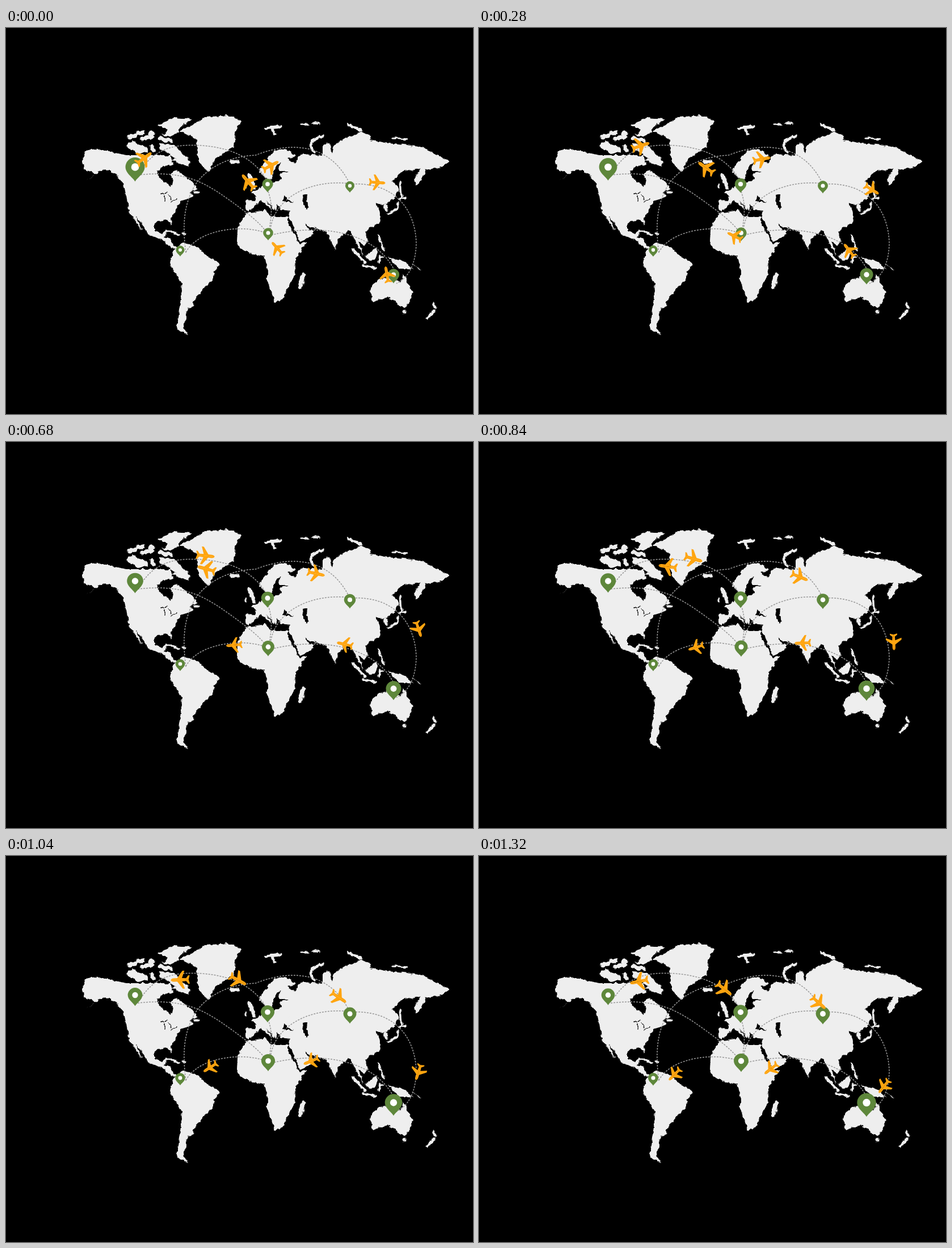
An HTML page that plays this animation: 823x680 px, repeating every 1360 ms.

```html
<!DOCTYPE html>
<html lang="en">
<head>
<meta charset="utf-8">
<title>World flights</title>
<style>
  html, body { margin: 0; height: 100%; overflow: hidden; background: #000; }
  svg { display: block; width: 100%; height: 100%; }
  #land { fill: #eee; filter: url(#coast); }
  #land g { fill: none; stroke: #eee; stroke-linecap: round; stroke-linejoin: round; }
  #routes { fill: none; stroke: #999; stroke-width: 1.5; stroke-dasharray: 3 2; }
  #pins { fill: #5e873b; }
  #planes { fill: #ffa510; }
</style>
</head>
<body>
<svg viewBox="0 0 823 680">
  <defs>
    <filter id="coast" color-interpolation-filters="sRGB">
      <feTurbulence type="fractalNoise" baseFrequency=".13" numOctaves="2" seed="4"/>
      <feDisplacementMap in="SourceGraphic" scale="7" xChannelSelector="R" yChannelSelector="G"/>
    </filter>
    <g id="pin">
      <path d="M0 1.5C-.2 1.1-1 .65-1 0A1 1 0 0 1 1 0C1 .65 .2 1.1 0 1.5Z"/>
      <circle r=".4" fill="#fff"/>
    </g>
    <path id="half" d="M16 0Q15-2.6 11-2.8H5L-4-15H-7.5L-3-2.8-10-2.4-13.5-7H-16L-14 .1Z"/>
    <g id="plane">
      <use href="#half"/>
      <use href="#half" transform="scale(1 -1)"/>
    </g>
  </defs>

  <g id="land">
    <!-- North America -->
    <path d="M135 234L140 216 157 213 213 224 270 224 290 224 294 240 278 242 267 250 270 265 286 275 291 280 294 266 289 257 300 250 325 268 338 283 322 290 303 302 213 302 210 282 200 264 183 251 168 250 138 272 158 257 137 247Z"/>
    <path d="M213 288L322 288 330 297 308 305 291 335 292 348 284 338 268 340 262 346 262 356 275 362 285 356 280 369 289 371 292 380 304 388 290 387 279 376 250 362 229 331 240 357 216 322Z"/>
    <path d="M268 172L295 158 328 160 306 175 304 183 288 191 276 188 285 180Z"/>
    <path d="M212 207L222 199 247 211 252 218 232 222Z"/>
    <path d="M270 204L296 206 324 234 322 245 290 233 300 230 270 212Z"/>
    <!-- Greenland -->
    <path d="M306 181L326 172 352 157 390 154 414 163 404 184 402 210 370 228 357 253 345 242 337 222 336 196Z"/>
    <!-- South America -->
    <path d="M296 390L313 378 334 384 354 402 376 415 366 432 364 445 349 458 329 484 330 490 322 493 316 506 319 514 313 522 314 532 321 540 304 534 301 522 310 465 309 450 289 415Z"/>
    <!-- Europe -->
    <path d="M449 281L462 262 470 274 484 266 483 258 497 252 484 252 480 247 485 236 474 245 468 268 446 256 447 247 472 217 492 212 511 226 497 230 508 238 519 222 560 224V290H449Z"/>
    <path d="M421 318L423 303 438 304 440 296 433 291 449 281 540 285V351L525 345 536 355 543 358 536 368 518 376 502 340 498 335 501 322 484 320 478 310 476 322 458 304 468 319 449 304 427 324Z"/>
    <!-- Asia -->
    <path d="M558 290V205L570 203 575 222 578 206 600 193 625 183 642 190 640 198 700 205 733 210 782 235 768 245 740 250 732 268 722 278 720 265 730 246 716 252 702 250 682 268 693 285 690 290Z"/>
    <path d="M539 285H692L685 300 668 310 652 309 660 330 658 342 634 358 638 376 632 384 621 376 630 402 618 380 609 360 604 357 586 372 580 390 566 360 558 358 539 351Z"/>
    <path d="M634 402L652 387 655 395 650 408 640 409Z"/>
    <!-- Africa -->
    <path d="M424 326L458 321 468 333 498 333 495 341 517 380 530 377 508 411 510 432 486 479 474 483 459 442 462 430 455 402 430 398 411 386 407 376 408 355Z"/>
    <!-- Oceania -->
    <path d="M642 456L666 438 674 440 680 434 690 437 688 444 696 448 700 434 716 466 713 480 706 490 697 492 682 480 672 474 648 483 644 478Z"/>
    <path d="M674 404L704 412 716 424 692 424Z"/>
    <!-- Inland seas -->
    <path fill="#000" d="M487 305L490 297 507 307ZM523 295L531 293 530 305 534 314 530 319 525 312Z"/>
    <!-- Small islands, grouped by thickness -->
    <g stroke-width="7">
      <path d="M218 192l10-3M232 186l9-2M240 195l18-3M252 186l6-1M272 195l19 4M257 208l3 8M284 237l5 1"/>
      <path d="M398 236l11-1M524 435l-5 20M429 261L437 281M702 499v1"/>
    </g>
    <g stroke-width="5">
      <path d="M423 276v4M333 289h5M558 190L540 199 536 208 543 219M458 177l25-3M470 178l4 8"/>
      <path d="M604 170l9 4 12 6M667 312l4 9M612 390L632 413M754 485l2 7M753 500l-11 11"/>
    </g>
    <g stroke-width="3.5">
      <path d="M282 358l12 1 10 5M311 363h6M519 170h14M540 168h12M682 194l26 2M695 271l2 26"/>
      <path d="M694 301l9-2M691 308L690 318 674 327M657 364l3 12 6 14M630 418l22 5M657 412l2-9h6"/>
    </g>
    <path d="M714 414l18 12-4-1Z"/>
    <g style="stroke:#000" stroke-width="1.5"><path d="M273 292l10-2M281 296v8M286 294l5 7M291 306l10-4"/></g>
  </g>

  <g id="routes">
    <path d="M240 247C268 206 310 205 345 207C400 211 440 232 459 268"/>
    <path d="M232 259C315 250 350 272 395 304C425 326 445 340 461 362"/>
    <path d="M317 395C340 352 425 345 462 363"/>
    <path d="M317 396C311 350 312 310 335 274C360 240 400 226 440 224C500 200 570 202 605 273"/>
    <path d="M462 288C470 310 468 330 464 355"/>
    <path d="M466 355C472 300 535 266 606 274"/>
    <path d="M463 366C540 345 650 352 686 430"/>
    <path d="M606 275C690 270 722 325 723 380C722 415 710 440 688 450"/>
  </g>
  <g id="pins"></g>
  <g id="planes"></g>
</svg>
<script>
const LOOP = 1360, STEP = 40, LAST = LOOP - STEP, CRUISE = 1040;

// x, y, head radius at the start and end of the loop
const pins = [
  [227.5, 245, 17, 11.8],
  [461, 275, 9.6, 12.8],
  [606, 278, 8, 12.4],
  [462, 361, 8.8, 13],
  [307, 391, 7.6, 9],
  [683, 434.5, 10.2, 16.7],
];

// Arc centre x, y, radius, angles at the start, end of cruise and end of loop, scale
const planes = [
  [334.5, 353.5, 154, -126.4, -61.2, -50.7, 1.04],
  [312, 369, 151, -40.4, -91.9, -101.2, 1.05],
  [521, 346, 117, -117.9, -56.2, -48.5, 1],
  [648, 355, 83, -85.9, 18, 37.7, .92],
  [410, 449, 91.5, -41.8, -123, -135.4, .9],
  [575, 452, 98, -10.3, -112.1, -127.9, .92],
];

function addUses(groupId, shapeId, count) {
  const group = document.getElementById(groupId);
  return Array.from({ length: count }, () => {
    const use = document.createElementNS(group.namespaceURI, "use");
    use.setAttribute("href", "#" + shapeId);
    return group.appendChild(use);
  });
}

const pinNodes = addUses("pins", "pin", pins.length);
const planeNodes = addUses("planes", "plane", planes.length);

const place = (node, x, y, turn, scale) =>
  node.setAttribute("transform", `translate(${x} ${y}) rotate(${turn}) scale(${scale})`);

// Steady speed during cruise, then a smooth slowdown
function arcAngle(t, start, cruiseEnd, end) {
  const speed = (cruiseEnd - start) / CRUISE;
  if (t <= CRUISE) return start + speed * t;
  const rest = LAST - CRUISE, q = (t - CRUISE) / rest, carry = speed * rest;
  return cruiseEnd + carry * q + (end - cruiseEnd - carry) * q * q;
}

function draw(now) {
  const t = Math.floor((now % LOOP) / STEP) * STEP;
  pins.forEach(([x, y, from, to], i) =>
    place(pinNodes[i], x, y, 0, from + (to - from) * t / LAST));
  planes.forEach(([cx, cy, r, start, cruiseEnd, end, scale], i) => {
    const angle = arcAngle(t, start, cruiseEnd, end), rad = angle * Math.PI / 180;
    const heading = angle + (end > start ? 90 : -90);
    place(planeNodes[i], cx + r * Math.cos(rad), cy + r * Math.sin(rad), heading, scale);
  });
}

const begin = performance.now();
function tick() {
  draw(performance.now() - begin);
  requestAnimationFrame(tick);
}
tick();
</script>
</body>
</html>
```
